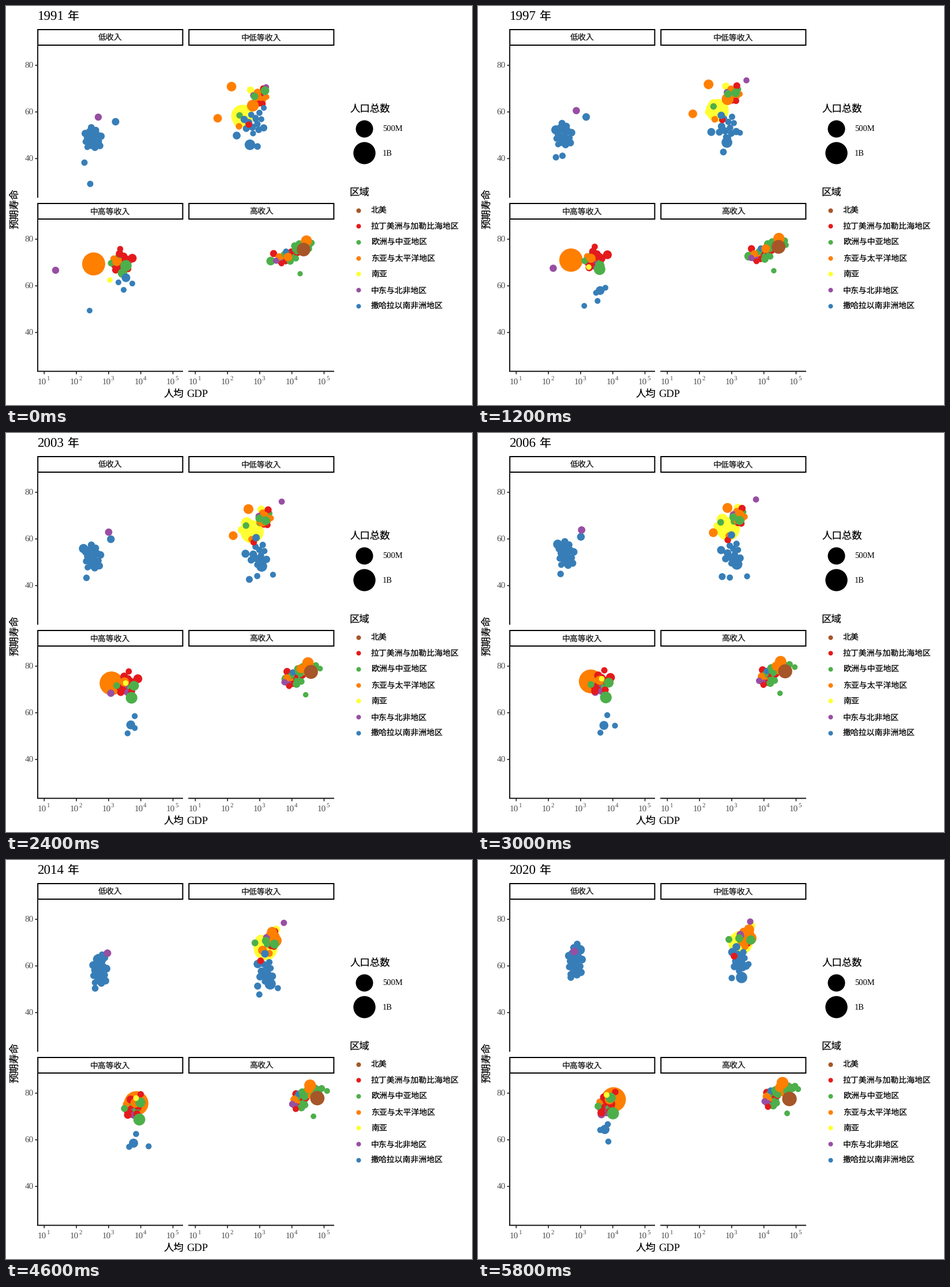
Recreate the animation shown at these times as a matplotlib script. Size 808 by 693 pixels, loop 6000 ms.

```python
import random
import numpy as np
import matplotlib.pyplot as plt
from matplotlib.animation import FuncAnimation
from matplotlib.patches import Rectangle

W, H, DPI = 808, 693, 64
PT = 72 / DPI  # points per pixel
YEARS = range(1991, 2021)
U = np.linspace(0, 1, len(YEARS))
INCOME = U * U * (3 - 2 * U)  # incomes ease in and out, lifespans rise evenly
BEND = np.sin(np.pi * U)
GOLDEN = np.pi * (3 - 5 ** 0.5)

BROWN, RED, GREEN, ORANGE = "#A65628", "#E41A1C", "#4DAF4A", "#FF7F00"
YELLOW, PURPLE, BLUE = "#FFFF33", "#984EA3", "#377EB8"
GRAY = "#4D4D4D"
CJK, SERIF = "Noto Sans CJK JP", "Liberation Serif"

rng = random.Random(4)
plt.rcParams["text.hinting"] = "none"
fig = plt.figure(figsize=(W / DPI, H / DPI), dpi=DPI, facecolor="white")
ax = fig.add_axes([0, 0, 1, 1])
ax.set(xlim=(0, W), ylim=(H, 0))
ax.axis("off")


def text(x, y, s, size, font=CJK, color="black", **kw):
    """Text whose glyphs are centred on height y."""
    base = y + size * (0.38 if font == CJK else 0.33)
    return ax.text(x, base, s, fontsize=size * PT, family=font, color=color,
                   va="baseline", **kw)


def line(x0, y0, x1, y1, color="black"):
    ax.plot([x0, x1], [y0, y1], color=color, lw=1.8 * PT,
            solid_capstyle="butt", snap=False)


def dots(x, y, r, color, z=1):
    return ax.scatter(x, y, s=(2 * np.asarray(r) * PT) ** 2, c=color,
                      linewidths=0, zorder=z)


# Panels, strips and axes
names = iter(["低收入", "中低等收入", "中高等收入", "高收入"])
for top in (69, 371):
    for left in (55, 317):
        ax.add_patch(Rectangle((left + 0.2, top - 28), 251.2, 27, fc="white",
                               ec="black", lw=2 * PT, snap=False, zorder=3))
        text(left + 126, top - 14.3, next(names), 13.9, color="#1A1A1A",
             ha="center", zorder=4)
    line(55, top, 55, top + 264)
    for i in range(3):
        y = top + 34 + 81 * i
        line(50.5, y, 55, y, "#333333")
        text(47.5, y, str(80 - 20 * i), 15.3, SERIF, GRAY, ha="right")

for left in (55, 317):
    line(left - 0.9, 634.5, left + 252, 634.5)
    for i in range(5):
        x = left + 11.3 + 55.8 * i
        line(x, 635, x, 639.5, "#333333")
        text(x - 11.5, 652.5, "10", 15.3, SERIF, GRAY)
        text(x + 4, 646.5, str(i + 1), 11, SERIF, GRAY)

text(274, 673, "人均", 17.4)
text(313, 673, "GDP", 18.5, SERIF)
ax.text(16, 352, "预期寿命", fontsize=17.4 * PT, family=CJK, rotation=90,
        ha="center", va="center")
year_text = text(55, 16.5, "", 23, SERIF)
text(106.5, 16.5, "年", 20)

# Legends
text(597, 178, "人口总数", 17.4)
for y, r, name in ((213, 15, "500M"), (255, 19.2, "1B")):
    dots(620.5, y, r, "black")
    text(653, y, name, 14.5, SERIF)
text(596, 323, "区域", 17.4)
regions = [(BROWN, "北美"), (RED, "拉丁美洲与加勒比海地区"),
           (GREEN, "欧洲与中亚地区"), (ORANGE, "东亚与太平洋地区"),
           (YELLOW, "南亚"), (PURPLE, "中东与北非地区"),
           (BLUE, "撒哈拉以南非洲地区")]
for i, (color, name) in enumerate(regions):
    y = 354.5 + 27.7 * i
    dots(611, y, 4, color)
    text(633, y, name, 13.9)

tracks, radii, colors = [], [], []


def bubble(color, r, start, end, bend=(0, 0)):
    """A bubble that drifts from start to end, bowed by bend at mid-time."""
    (x0, y0), (x1, y1) = start, end
    tracks.append((x0 + (x1 - x0) * INCOME + bend[0] * BEND,
                   y0 + (y1 - y0) * U + bend[1] * BEND))
    radii.append(r)
    colors.append(color)


def crowd(mix, start, end, size0, size1, bend=(0, 0), slope=0):
    """Small bubbles spread evenly over a drifting, sheared ellipse."""
    members = [c for c, count in mix.items() for _ in range(count)]
    rng.shuffle(members)
    n = len(members)
    for k, color in enumerate(members):
        d, a = ((k + 0.5) / n) ** 0.5, GOLDEN * k

        def place(centre, size):
            dx, dy = size[0] * d * np.cos(a), size[1] * d * np.sin(a)
            return centre[0] + dx, centre[1] + dy + slope * dx

        bubble(color, rng.uniform(5, 6.6), place(start, size0),
               place(end, size1), bend)


# Low income
crowd({BLUE: 17}, (150, 230), (168, 178), (17, 20), (14, 27), (-7, 8))
bubble(BLUE, 5.5, (136, 272), (161, 204), (-6, 8))
bubble(BLUE, 5.5, (146, 309), (172, 146), (-4, -25))
bubble(BLUE, 7.8, (146, 229), (177, 156), (-24, 2))
bubble(BLUE, 6.5, (190, 201), (168, 161))
bubble(PURPLE, 6.2, (160, 193), (167, 159), (16, -7))

# Lower middle income
bubble(YELLOW, 9.5, (409, 190), (452, 136), (-8, -12))
bubble(YELLOW, 19.5, (410, 191), (455, 144))
bubble(YELLOW, 9.5, (418, 182), (450, 157))
bubble(YELLOW, 6.3, (401, 203), (446, 142), (-10, -10))
bubble(YELLOW, 6.3, (424, 146), (474, 114))
crowd({RED: 4, ORANGE: 4, PURPLE: 3, GREEN: 2}, (441, 158), (464, 133),
      (14, 15), (11, 15), slope=-0.4)
bubble(PURPLE, 5.2, (451, 141), (472, 107), (20, -8))
bubble(ORANGE, 10.2, (428, 173), (472, 136), (0, -6))
bubble(ORANGE, 8, (435, 157), (470, 127))
bubble(ORANGE, 8.3, (391, 140), (470, 121))
bubble(ORANGE, 7.4, (367, 195), (460, 143), (-8, 5))
bubble(ORANGE, 5.7, (404, 209), (463, 150))
bubble(GREEN, 7.5, (449, 147), (473, 139), (-8, 9))
bubble(GREEN, 6.5, (431, 157), (453, 136))
bubble(GREEN, 5.6, (405, 190), (435, 138), (0, -8))
crowd({BLUE: 11}, (432, 205), (455, 178), (18, 22), (12, 20), (-2, 20))
bubble(BLUE, 9.2, (423, 241), (457, 204), (8, 6))
bubble(BLUE, 5.2, (433, 197), (440, 205), (0, 50))
bubble(BLUE, 5, (447, 177), (469, 181), (8, 70))
bubble(BLUE, 5.8, (436, 244), (450, 185), (-20, 36))
bubble(BLUE, 6.8, (400, 225), (441, 160), (0, 12))
bubble(RED, 5.5, (421, 206), (444, 167))
bubble(BLUE, 6.3, (413, 197), (448, 151), (8, 4))

# Upper middle income
bubble(ORANGE, 20, (152, 448), (235, 416))
bubble(PURPLE, 6.2, (86, 459), (214, 442), (50, 0))
bubble(RED, 10.2, (207, 443), (227, 424))
crowd({RED: 10, GREEN: 3, ORANGE: 3, PURPLE: 2}, (199, 446), (220, 427),
      (17, 17), (12, 16))
bubble(RED, 7.5, (219, 438), (224, 418), (8, -3))
bubble(RED, 5.3, (198, 422), (238, 403))
bubble(ORANGE, 7.8, (192, 444), (228, 416))
bubble(GREEN, 9.8, (208, 451), (234, 440), (0, 14))
bubble(GREEN, 8.2, (202, 464), (230, 413), (10, -4))
bubble(YELLOW, 4.7, (180, 476), (223, 408), (12, -14))
bubble(BLUE, 4.9, (145, 529), (226, 489), (50, 0))
bubble(BLUE, 7.5, (208, 472), (220, 468), (4, 38))
bubble(BLUE, 5, (219, 482), (225, 459), (2, 20))
bubble(BLUE, 5, (204, 493), (212, 469), (4, 40))
bubble(BLUE, 5, (195, 480), (217, 468), (12, 34))

# High income
bubble(GREEN, 7.5, (459, 443), (509, 414), (8, -4))
bubble(RED, 6.2, (464, 430), (501, 404), (10, -5))
crowd({RED: 6, PURPLE: 4, GREEN: 5, ORANGE: 2, BLUE: 1}, (488, 436),
      (509, 415), (20, 11), (12, 16), (4, 0), slope=-0.3)
crowd({GREEN: 11, ORANGE: 3, PURPLE: 1}, (514, 417), (531, 399),
      (17, 8), (20, 7), slope=-0.25)
bubble(ORANGE, 7.5, (489, 436), (523, 395), (10, -10))
bubble(GREEN, 4.8, (526, 422), (555, 398), (8, -3))
bubble(GREEN, 4.6, (510, 465), (536, 440))
bubble(ORANGE, 9.6, (521, 408), (528, 387))
bubble(BROWN, 11.8, (516, 423), (540, 415), (4, -5))

tracks, radii = np.array(tracks), np.array(radii)
bubbles = dots(tracks[:, 0, 0], tracks[:, 1, 0], radii, colors, z=2)


def update(i):
    bubbles.set_offsets(tracks[:, :, i])
    bubbles.set_sizes((2 * radii * (1 + 0.07 * U[i]) * PT) ** 2)
    year_text.set_text(str(YEARS[i]))
    return bubbles, year_text


anim = FuncAnimation(fig, update, frames=len(YEARS), interval=200,
                     repeat=True, repeat_delay=0)
plt.show()
```
